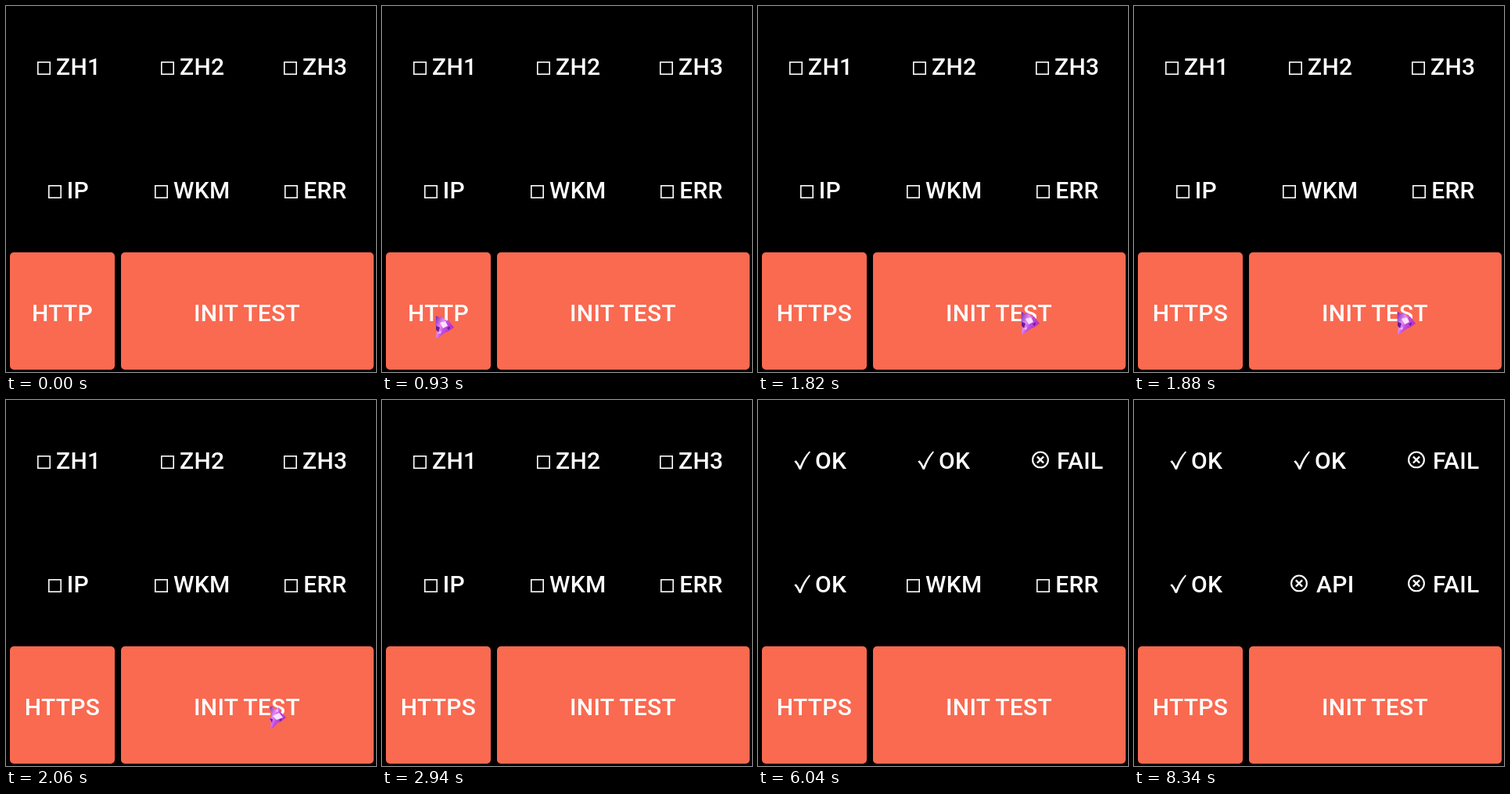
Write an HTML page that moves like this. It is 473 px wide and 468 px high and loops after 9.47 s.

```html
<!DOCTYPE html>
<html lang="en">
<head>
<meta charset="utf-8">
<title>Service checks</title>
<style>
  html, body { margin: 0; width: 100%; height: 100%; overflow: hidden; background: #000; }
  svg { display: block; width: 473px; height: 468px; }
  text { font: 500 30px Roboto, sans-serif; letter-spacing: .01em; fill: #fff; }
  .middle { text-anchor: middle; }
  .button { fill: #f96a51; }
  .line { fill: none; stroke: #fff; }

  /* Each swap flips --done once per loop, exchanging its two states. */
  .swap { --done: 0; animation: 9470ms step-end infinite; }
  .before { opacity: calc(1 - var(--done)); }
  .after { opacity: var(--done); }
  .http { animation-name: http; }
  .zh1 { animation-name: zh1; }
  .zh2 { animation-name: zh2; }
  .zh3 { animation-name: zh3; }
  .ip { animation-name: ip; }
  .api { animation-name: api; }
  .err { animation-name: err; }
  .press { animation-name: press; }
  @keyframes http { 0% { --done: 0 } 11.19%, 100% { --done: 1 } }
  @keyframes zh1 { 0% { --done: 0 } 34.31%, 100% { --done: 1 } }
  @keyframes zh2 { 0% { --done: 0 } 45.51%, 100% { --done: 1 } }
  @keyframes zh3 { 0% { --done: 0 } 57.97%, 100% { --done: 1 } }
  @keyframes ip { 0% { --done: 0 } 63.78%, 100% { --done: 1 } }
  @keyframes api { 0% { --done: 0 } 76.24%, 100% { --done: 1 } }
  @keyframes err { 0% { --done: 0 } 88.06%, 100% { --done: 1 } }
  @keyframes press { 0% { --done: 0 } 21.75%, 100% { --done: 1 } }

  .pointer { animation: pointer 9470ms linear infinite; }
  @keyframes pointer {
    0%, 2.53% { transform: translate(267px, 480px) }
    2.535% { transform: translate(266px, 452px); animation-timing-function: ease-in-out }
    9.82%, 14.8% { transform: translate(69px, 396px); animation-timing-function: ease-in-out }
    19.2%, 28.6% { transform: translate(337px, 391px); animation-timing-function: ease-in }
    31.04%, 100% { transform: translate(317px, 470px) }
  }
</style>
</head>
<body>
<svg viewBox="0 0 473 468">
  <defs>
    <rect id="box" class="line" x=".8" y="-16.2" width="15.4" height="15.4" stroke-width="1.6"/>
    <path id="tick" fill="#fff" d="M.3-9.6 2.7-10.8Q5.6-7.6 7.6-3.2 12-14.6 19.6-22.6L21-21.6Q13.5-12.4 9 .7H6.6Q4-6 .3-9.6Z"/>
    <g id="cross" class="line" stroke-width="2.1">
      <circle cx="11" cy="-11.6" r="9.9"/>
      <path d="M6.9-15.7l8.2 8.2m0-8.2-8.2 8.2" stroke-width="2.4"/>
    </g>
    <linearGradient id="crystal" x2="1" y2=".6">
      <stop offset="0" stop-color="#7a1fb0"/>
      <stop offset=".4" stop-color="#e58cf2"/>
      <stop offset=".6" stop-color="#c04be0"/>
      <stop offset="1" stop-color="#b32bb8"/>
    </linearGradient>
  </defs>

  <g class="swap zh1">
    <g class="before"><use href="#box" x="40" y="88"/><text x="64" y="88">ZH1</text></g>
    <g class="after"><use href="#tick" x="46" y="88"/><text x="73" y="88">OK</text></g>
  </g>
  <g class="swap zh2">
    <g class="before"><use href="#box" x="198" y="88"/><text x="222" y="88">ZH2</text></g>
    <g class="after"><use href="#tick" x="204" y="88"/><text x="231" y="88">OK</text></g>
  </g>
  <g class="swap zh3">
    <g class="before"><use href="#box" x="355" y="88"/><text x="379" y="88">ZH3</text></g>
    <g class="after"><use href="#cross" x="350" y="88"/><text x="382" y="88">FAIL</text></g>
  </g>
  <g class="swap ip">
    <g class="before"><use href="#box" x="54" y="246"/><text x="77.7" y="246">IP</text></g>
    <g class="after"><use href="#tick" x="46" y="246"/><text x="73" y="246">OK</text></g>
  </g>
  <g class="swap api">
    <g class="before"><use href="#box" x="190" y="246"/><text x="214" y="246">WKM</text></g>
    <g class="after"><use href="#cross" x="200" y="246"/><text x="233" y="246">API</text></g>
  </g>
  <g class="swap err">
    <g class="before"><use href="#box" x="356" y="246"/><text x="380.3" y="246">ERR</text></g>
    <g class="after"><use href="#cross" x="350" y="246"/><text x="382" y="246">FAIL</text></g>
  </g>

  <rect class="button" x="5" y="315" width="134" height="150" rx="5"/>
  <rect class="button" x="147" y="315" width="323" height="150" rx="5"/>
  <g class="swap http">
    <text class="before middle" x="72" y="403">HTTP</text>
    <text class="after middle" x="72" y="403">HTTPS</text>
  </g>
  <text class="middle" x="308" y="403">INIT TEST</text>

  <g class="pointer">
    <g class="swap press">
      <g class="before">
        <path fill="url(#crystal)" d="M0 0 4 2 7 1 13 6 16 6 23 15 16 20 11 22 2 29 0 28 1 20-.5 12Z"/>
        <path fill="#fbe2ff" d="M5 9 12 7 15 13 9 16Z"/>
        <path fill="#6a1a9c" d="M0 13 5 15 3 21 0 18ZM14 16 18 13 17 18Z"/>
        <path fill="#f3b5fa" d="M2 22 7 19 6 23Z"/>
      </g>
      <g class="after">
        <path fill="url(#crystal)" d="M0 2 3 0 6 5 12 2 14 8 21 15 15 20 10 22 5 28 1 29 2 21-1 17 3 13Z"/>
        <path fill="#fbe2ff" d="M4 13 12 9 17 15 9 18Z"/>
        <path fill="#6a1a9c" d="M0 16 4 17 3 22ZM12 18 16 16 14 20Z"/>
        <path fill="#f3b5fa" d="M7 7 11 4 11 8Z"/>
      </g>
    </g>
  </g>
</svg>
</body>
</html>
```
